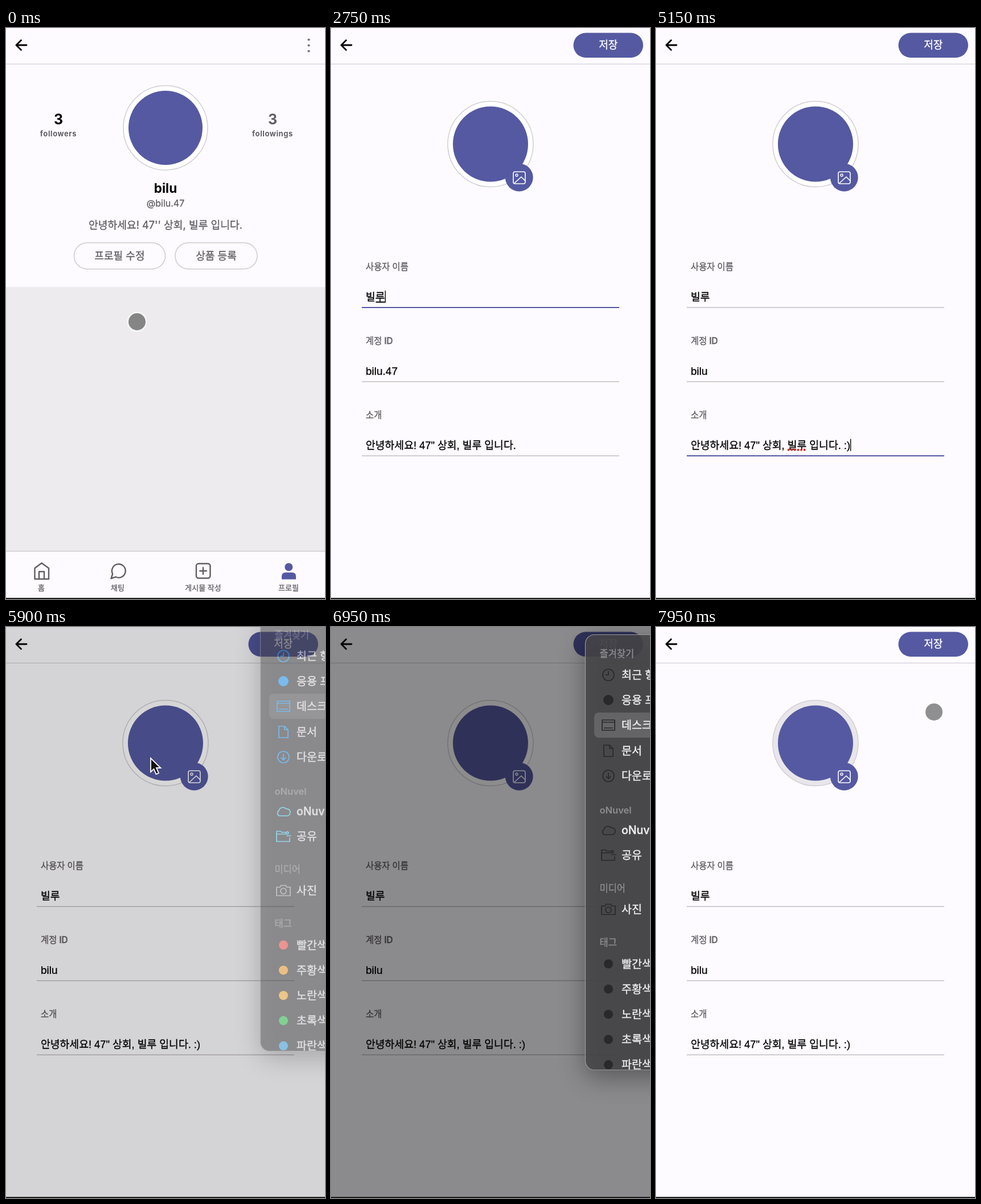
An HTML page for the animation above (8000 ms loop, 560 px wide and 1001 px high).

```html
<!DOCTYPE html>
<html lang="ko">
<head>
<meta charset="utf-8">
<title>Profile edit</title>
<style>
  html, body { margin: 0; height: 100%; overflow: hidden; background: #fdfbff; }
  svg { display: block; width: 100vw; height: 100vh; }
  text { font-family: Inter, "Noto Sans CJK KR", sans-serif; white-space: pre; }
  .field { font-family: "Liberation Sans", "Noto Sans CJK KR", sans-serif; }
  .mid { text-anchor: middle; }
  .line { fill: none; stroke-linecap: round; stroke-linejoin: round; }
  #sheet { filter: drop-shadow(0 12px 22px rgba(0, 0, 0, .42)); }
</style>
</head>
<body>
<svg id="stage" viewBox="0 0 560 1001" preserveAspectRatio="none"></svg>
<script>
const LOOP = 8000, STEP = 50;
const INDIGO = '#5559a2', GREY = '#605d63', RULE = '#d0ced2';
const BIO = '안녕하세요! 47" 상회, 빌루 입니다.';

// A hairline stroke firms up the lighter weights.
const label = (x, y, size, str, fill = GREY, weight = 400, extra = 'class="mid"') =>
  `<text x="${x}" y="${y}" font-size="${size}" fill="${fill}" font-weight="${weight}"
    stroke="${fill}" stroke-width="${weight > 500 ? 0 : weight / 1400}" ${extra}>${str}</text>`;
const line = (d, color, width, extra = '') =>
  `<path class="line" d="${d}" stroke="${color}" stroke-width="${width}" ${extra}/>`;
const disc = (x, y, r, fill, extra = '') =>
  `<circle cx="${x}" cy="${y}" r="${r}" fill="${fill}" ${extra}/>`;
const box = (x, y, w, h, r, fill, extra = '') =>
  `<rect x="${x}" y="${y}" width="${w}" height="${h}" rx="${r}" fill="${fill}" ${extra}/>`;

const avatar = (y, r, back, dot) =>
  disc(280, y, r, back, `stroke="${RULE}" stroke-width="1.5"`) + disc(280, y, dot, INDIGO);

function header() {
  return box(0, 62.5, 560, 1.5, 0, '#dad8dc') +
    line('M36 30H18M26.5 21.5L18 30L26.5 38.5', '#000', 2.8);
}

function profilePage() {
  const pill = (x, w, str) =>
    box(x, 376.5, w, 46, 23, 'none', 'stroke="#cdcbcf" stroke-width="1.5"') +
    label(x + w / 2, 406, 18.1, str);
  const stat = (x, color, str) =>
    label(x, 169, 25, '3', color, 700) +
    label(x, 190, 13, str, GREY, 700, 'class="mid" letter-spacing=".6"');
  const tabs = [[62, '홈'], [196, '채팅'], [346, '게시물 작성'], [496, '프로필']];
  return [20.5, 30.5, 40.5].map(y => disc(531.5, y, 2.1, '#77747a')).join('') +
    stat(92, '#000', 'followers') + stat(468, GREY, 'followings') +
    avatar(175, 74, '#fff', 65) +
    label(280, 289, 22.5, 'bilu', '#000', 700) +
    label(280, 313, 16, '@bilu.47') +
    label(280, 352, 18.2, BIO.replace('"', "''")) +
    pill(119.5, 160, '프로필 수정') + pill(297, 144, '상품 등록') +
    box(0, 454, 560, 463, 0, '#edebee') +
    box(0, 916.5, 560, 1.5, 0, RULE) +
    line('M50.5 947L62.5 938L75 947V966H50.5ZM58 966V953H67V966', GREY, 2.4) +
    line('M184.5 965L187.2 957A11.9 11.9 0 1 1 192.5 962.3Z', GREY, 2.4) +
    box(334, 939, 24.5, 25.5, 4, 'none', `stroke="${GREY}" stroke-width="2.4"`) +
    line('M346 946V957.5M340.3 951.7H352', GREY, 2.4) +
    disc(496.3, 945, 7, INDIGO) +
    `<path d="M484 966.5V961Q484 954.5 491 954.5H502Q509 954.5 509 961V966.5Z" fill="${INDIGO}"/>` +
    tabs.map(([x, str]) => label(x, 986, 13, str)).join('');
}

const fields = [
  { y: 490, title: '사용자 이름', size: 18.3, focus: [1300, 2900],
    text: [[0, 'bilu'], [1750, 'bil'], [1850, 'bi'], [1950, 'b'], [2050, ''],
      [2200, 'ㅂ'], [2350, '비'], [2500, '빌'], [2600, '빌루']] },
  { y: 620, title: '계정 ID', size: 19, focus: [3000, 3950],
    text: [[0, 'bilu.47'], [3100, 'bilu.4'], [3200, 'bilu.'], [3300, 'bilu']] },
  { y: 750, title: '소개', size: 18.25, focus: [4000, 5650],
    text: [[0, BIO], [4150, BIO + ' '], [4300, BIO + ' :'], [4450, BIO + ' :)']] }
];

function editPage() {
  return box(425.5, 8.5, 122.5, 43.5, 21.7, INDIGO, 'id="save"') +
    label(486.7, 36, 18, '저장', '#fff', 500) +
    `<g id="before">${avatar(203.5, 75, '#fff', 66)}</g>` +
    `<g id="after">${avatar(203.5, 75, '#e8e6ea', 66)}</g>` +
    disc(330.3, 262, 24.4, INDIGO) +
    box(320, 252, 21, 21, 3, 'none', 'stroke="#fff" stroke-width="1.6"') +
    disc(326, 258, 2, 'none', 'stroke="#fff" stroke-width="1.4"') +
    line('M322 272L334 261L341 268', '#fff', 1.6) +
    fields.map((f, i) =>
      label(61, f.y - 66.5, 15.4, f.title, GREY, 500, '') +
      box(54, f.y - 1, 452, 2, 0, RULE, `id="rule${i}"`) +
      label(61, f.y - 12.5, f.size, '', '#000', 400, `class="field" id="text${i}"`)).join('') +
    box(0, 479.5, 16, 2, 0, '#000', 'id="compose"') +
    box(0, 0, 1.4, 21, 0, '#000', 'id="caret"') +
    line('', '#d3281f', 4, 'id="spell" stroke-dasharray="0 5.6"');
}

// Sidebar rows: centre line, text, icon path (null for a plain disc).
const rows = [
  [84, '최근 항목', 'M-10 0A10 10 0 1 1 10 0A10 10 0 1 1 -10 0M0 -6V0H-5'],
  [128, '응용 프로그램', null],
  [172, '데스크탑', 'M-11 -9H11V9H-11ZM-11 -5H11M-7 5H7'],
  [217, '문서', 'M-8 -10H2L8 -4V10H-8ZM2 -10V-4H8'],
  [261, '다운로드', 'M-10 0A10 10 0 1 1 10 0A10 10 0 1 1 -10 0M0 -5V5M-4 1L0 5L4 1'],
  [356, 'oNuvel Space', 'M-7 8A5 5 0 0 1 -8 -1A7.5 7.5 0 0 1 5 -4A6 6 0 0 1 7 8Z'],
  [400, '공유', 'M5 -7H-3L-5 -9H-12V9H11V3M-12 -4H4M9 -6A2 2 0 1 1 9 -6.1M6 -1H13'],
  [495, '사진', 'M-12 -6H-6L-4 -9H4L6 -6H12V9H-12ZM-5 1A5 5 0 1 1 5 1A5 5 0 1 1 -5 1']
];
const tags = [['빨간색', '#ff6259'], ['주황색', '#ffb03f'], ['노란색', '#ffbd45'],
  ['초록색', '#3fd05c'], ['파란색', '#4bb4ee']];
const heads = [[47, '즐겨찾기', 500], [321, 'oNuvel', 600], [458, '미디어', 500], [553, '태그', 500]];

function panel(live) {
  const tint = i => !live ? '#29282b' : i === 7 ? '#b5b4b6' : i > 4 ? '#5fdcfa' : '#2ea8ff';
  const row = (y, str) => label(510, y + 7, 19.5, str, '#f0eff1', 500, '');
  return box(446.5, 13.5, 700, 763, 16, '#464548',
      'id="sheet" fill-opacity=".88" stroke="#99989b" stroke-width="1.2"') +
    '<g clip-path="url(#edge)">' +
    box(462, 150, 300, 44, 8, '#646366') +
    heads.map(([y, str, w]) => label(471.5, y + 6, 16.5, str, '#8d8c8f', w, '')).join('') +
    rows.map(([y, str, d], i) => (d
      ? `<g transform="translate(487 ${y})">${line(d, tint(i), 1.7)}</g>`
      : disc(487, y, 9, tint(i))) + row(y, str)).join('') +
    tags.map(([str, color], i) => {
      const y = 590.5 + i * 44.2;
      return disc(487, y, 8, live ? color : '#29282b') + row(y, str);
    }).join('') + '</g>';
}

const stage = document.getElementById('stage');
stage.innerHTML =
  '<defs><clipPath id="edge"><rect x="447" y="14" width="699" height="762" rx="16"/></clipPath></defs>' +
  box(0, 0, 560, 1001, 0, '#fdfbff') + header() +
  `<g id="profile">${profilePage()}</g><g id="edit">${editPage()}</g>` +
  box(0, 0, 560, 1001, 0, '#000', 'id="dim"') +
  `<g id="panel"><g id="live">${panel(true)}</g><g id="idle">${panel(false)}</g></g>` +
  box(0, 999, 560, 2, 0, '#1c1b1d') +
  `<g id="dot">${disc(0, 0, 16.3, 'none', 'stroke="#fff" stroke-opacity=".6" stroke-width="2.6"')}` +
  disc(0, 0, 15, '#000', 'opacity=".435"') + '</g>' +
  '<path id="arrow" d="M0 0V24L5.5 19L9.5 28L14 26L10 17H17.5Z" fill="#111" stroke="#fff" stroke-width="1.8"/>';

const el = {};
for (const node of stage.querySelectorAll('[id]')) el[node.id] = node;

const set = (node, attrs) => { for (const k in attrs) node.setAttribute(k, attrs[k]); };
const show = (node, on) => { node.style.display = on ? '' : 'none'; };
const within = (t, [a, b]) => t >= a && t < b;
const pick = (steps, t) => steps.filter(s => s[0] <= t).pop()[1];

// Interpolates rows of [time, ...values].
function tween(keys, t, ease = p => p) {
  if (t <= keys[0][0]) return keys[0].slice(1);
  const i = keys.findIndex(k => k[0] > t);
  if (i < 0) return keys[keys.length - 1].slice(1);
  const a = keys[i - 1], b = keys[i];
  const p = ease((t - a[0]) / (b[0] - a[0]));
  return a.slice(1).map((v, j) => v + (b[j + 1] - v) * p);
}
const smooth = p => p * p * (3 - 2 * p);

const pointer = [
  [0, 230, 515], [800, 202, 400], [900, 205, 404], [1100, 216, 444], [1300, 216, 470],
  [2800, 216, 470], [3000, 216, 601], [3700, 216, 601], [4000, 350, 731],
  [5200, 350, 731], [5600, 254, 230], [6150, 254, 230], [6400, 600, 330],
  [7500, 600, 330], [7550, 562, 300], [7700, 493, 171], [7900, 493, 171], [7950, 488, 149]
];
const typing = [[1750, 2800], [3100, 3700], [4150, 5200]];
const blinks = [[3450, 3700], [4800, 5100]];
const dimming = [[5650, 0], [5900, .16], [6050, .45], [6950, .45], [7100, 0]];
const sheet = [[5750, 0, -82], [5900, .55, -33], [6050, 1, 0], [6950, 1, 0], [7100, 0, 0]];

function drawFields(t) {
  let active = -1;
  fields.forEach((f, i) => {
    const on = within(t, f.focus);
    if (on) active = i;
    el['text' + i].textContent = pick(f.text, t);
    set(el['rule' + i], { fill: on ? INDIGO : RULE });
  });
  show(el.caret, active >= 0 && !blinks.some(b => within(t, b)));
  show(el.compose, active === 0 && t >= 2200);
  show(el.spell, active === 2);
  if (active < 0) return;
  const text = el['text' + active];
  const end = 61 + text.getComputedTextLength();
  set(el.caret, { x: end, y: fields[active].y - 29.5 });
  if (active === 0) set(el.compose, { x: end - 16 });
  if (active === 2) {
    const x = text.getStartPositionOfChar(BIO.indexOf('빌루')).x;
    set(el.spell, { d: `M${x + 2} 739.5h30` });
  }
}

function draw(time) {
  const t = Math.floor(time % LOOP / STEP) * STEP;
  const editing = t >= 900;
  show(el.profile, !editing);
  show(el.edit, editing);
  if (editing) {
    drawFields(t);
    set(el.save, { fill: t < 1750 ? '#c6c8e0' : INDIGO });
    show(el.before, t < 7300);
    show(el.after, t >= 7300);
  }

  set(el.dim, { opacity: tween(dimming, t)[0] });
  const [alpha, shift] = tween(sheet, t);
  show(el.panel, alpha > 0);
  set(el.panel, { opacity: alpha, transform: `translate(0 ${shift})` });
  show(el.live, t < 6800);
  show(el.idle, t >= 6800);

  const [x, y] = tween(pointer, t, smooth);
  const place = { transform: `translate(${x} ${y})` };
  const arrow = within(t, [5650, 7500]);
  set(el.dot, place);
  set(el.arrow, place);
  show(el.dot, !arrow && !typing.some(s => within(t, s)));
  show(el.arrow, arrow);
}

const start = performance.now();
function tick() {
  draw(performance.now() - start);
  requestAnimationFrame(tick);
}
tick();
</script>
</body>
</html>
```
